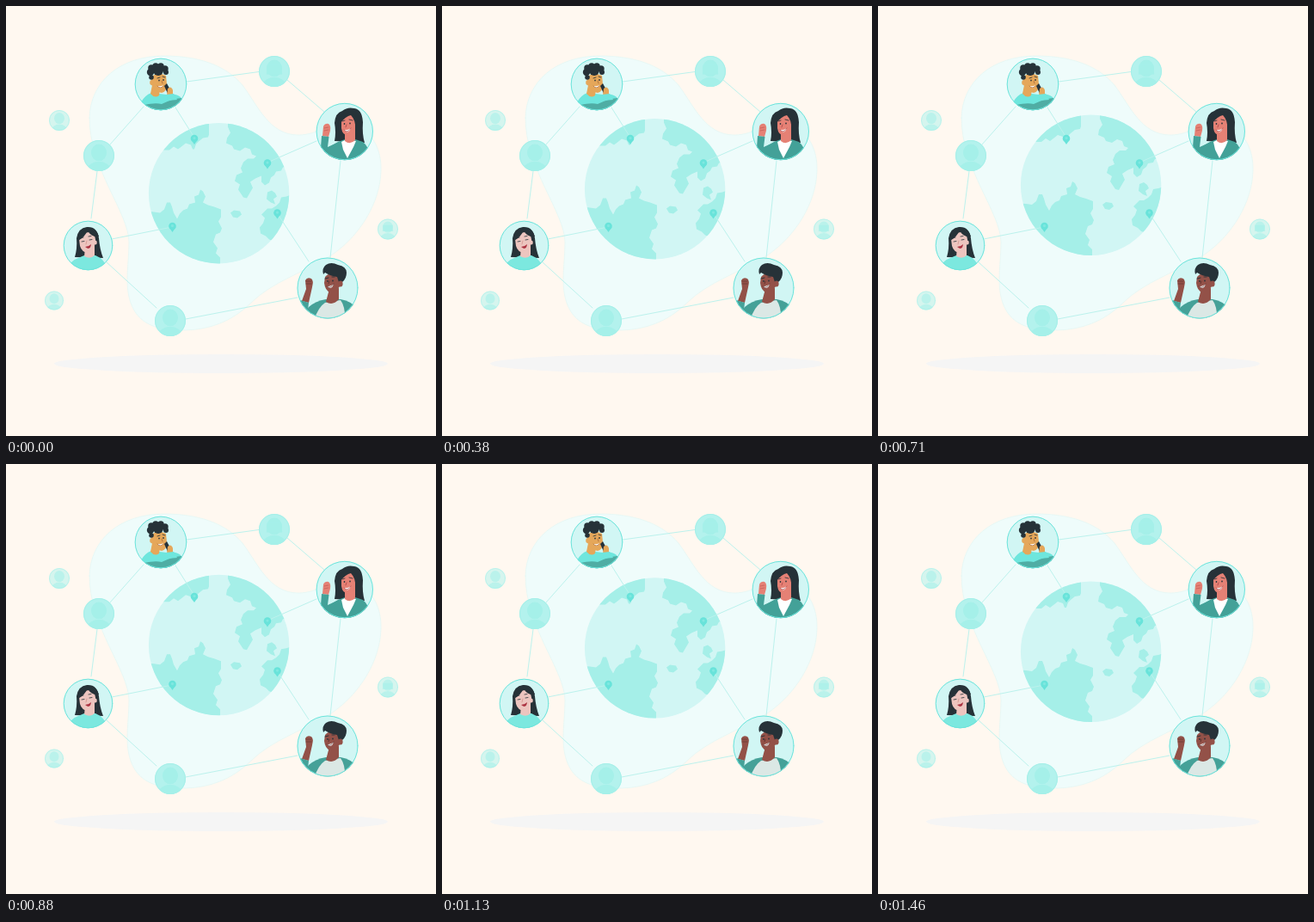
An HTML page with a canvas for the animation above (1500 ms loop, 500 by 500 pixels).

```html
<!DOCTYPE html>
<html lang="en">
<head>
<meta charset="utf-8">
<title>Connected globe</title>
<style>
html, body { margin: 0; width: 100%; height: 100%; overflow: hidden; background: #fff8f0; }
canvas { display: block; width: 100vw; height: 100vh; }
</style>
</head>
<body>
<canvas id="stage" width="500" height="500"></canvas>
<script>
const stage = document.getElementById('stage');
const ctx = stage.getContext('2d');

const LOOP = 1500, STEPS = 36, LIFT = 10;
const INK = '#263238', PALE = '#d1f6f4', LAND = '#a5efe8', AQUA = '#68e3da', LINE = '#bcf2ed';
const GLOBE = { x: 247.6, y: 218.3, r: 81.7 };

function fill(color, d) {
  ctx.fillStyle = color;
  ctx.fill(new Path2D(d));
}

function stroke(color, width, d) {
  ctx.strokeStyle = color;
  ctx.lineWidth = width;
  ctx.lineCap = 'round';
  ctx.stroke(new Path2D(d));
}

function oval(color, x, y, rx, ry = rx, turn = 0) {
  ctx.fillStyle = color;
  ctx.beginPath();
  ctx.ellipse(x, y, rx, ry, turn, 0, 7);
  ctx.fill();
}

function ring(color, width, x, y, r) {
  ctx.strokeStyle = color;
  ctx.lineWidth = width;
  ctx.beginPath();
  ctx.arc(x, y, r, 0, 7);
  ctx.stroke();
}

function clipped(x, y, r, draw) {
  ctx.save();
  ctx.beginPath();
  ctx.arc(x, y, r, 0, 7);
  ctx.clip();
  draw();
  ctx.restore();
}

function backdrop() {
  ctx.fillStyle = '#fff8f0';
  ctx.fillRect(0, 0, 500, 500);
  const blob = 'M97 130C98 88 132 58 184 58C222 58 255 68 275 92C293 116 306 150 340 150' +
    'C364 150 377 133 402 138C425 143 437 166 436 192C435 229 411 268 378 290' +
    'C345 311 310 320 284 346C262 367 236 377 205 377C175 377 141 371 141 318' +
    'C141 304 143 290 143 275C143 240 97 190 97 130Z';
  fill('#effcfb', blob);
  stroke('#e2f7f4', .7, blob);
  oval('#f5f5f5', 250, 416, 194, 11);
}

const continents = [
  'M236 130V150L235 153L229 154L224 158L221 161L219 167H217L215 162L209 160L204 164L200 167L195 164L190 168H183V130Z',
  'M258 130V141L261 148L257 154L256 160L263 163L265 167L272 169L278 165L284 167L286 173L291 175L288 178L281 178' +
    'L276 182L273 189L275 194L268 197L266 204L272 208L270 214L276 223L280 224L284 217L287 212L284 205L290 201' +
    'L297 198L297 205L301 209L306 206L308 200L312 197L314 193L320 192L322 188L335 187V130Z',
  'M304 217L309 215L313 218L315 222L311 225L313 231L308 229L303 225Z',
  'M335 219L326 222L320 223L318 229L314 233L309 236L304 236L297 243L301 247L299 253L295 258L296 265L302 268L306 272L315 275L335 250Z',
  'M261 241L265 238L272 239L274 243L269 247L264 246Z',
  'M160 239L172 240L179 241L184 237L187 229L191 229L193 234L195 241L199 248L202 242L206 238L211 236L213 231L220 229' +
    'L219 222L224 220L226 214L229 216L232 222L229 229L235 232L242 234L250 237L250 246L247 251L251 259L249 264' +
    'L244 266L241 275L246 282L244 288L249 293V305H160Z'
];

function globe(lift) {
  const { x, y, r } = GLOBE;
  ctx.save();
  ctx.translate(0, -lift);
  oval(PALE, x, y, r);
  clipped(x, y, r, () => continents.forEach(d => fill(LAND, d)));
  ctx.restore();
}

const links = 'M210 88L294 76.5M327 86L370 123M361 157L304 182M389 180L377 293M352 297L316 242' +
  'M339 339L209 364M175 351L117 298M123 271L193 257M99 247L106 192M121 161L160 117M197 118L219 153';

function pin(x, y) {
  fill(AQUA, `M${x - 3.4} ${y + 2}L${x} ${y + 7}L${x + 3.4} ${y + 2}Z`);
  oval(AQUA, x, y, 4.3);
  oval('#80e8e0', x, y - .4, 1.6);
}

// Pale contact: a bust in a disc, optionally with long hair.
function contact(x, y, r, opacity, longHair) {
  const tone = '#a5f0e9';
  ctx.globalAlpha = opacity;
  oval('#b3f2ed', x, y, r);
  clipped(x, y, r, () => {
    oval(tone, x, y - r * .2, r * .5, r * .55);
    if (longHair) fill(tone, `M${x - r * .45} ${y - r * .4}h${r * .9}l${r * .06} ${r * .6}h${-r * 1.02}Z`);
    oval(tone, x, y + r * .93, r * .75, r * .55);
  });
  ring(tone, 1, x, y, r - .5);
  ctx.globalAlpha = 1;
}

function portrait(x, y, r, draw) {
  oval(PALE, x, y, r);
  clipped(x, y, r, draw);
  ring('#6ce4db', 1, x, y, r - .5);
}

function eyes(x, y, gap) {
  oval(INK, x, y, .8, 1);
  oval(INK, x + gap, y - .5, .8, 1);
}

function caller() {
  const skin = '#e5a75a';
  fill('#6ee6dd', 'M152 123L157 112Q161 104 169 101L187 103Q199 101 204 107L212 123Z');
  fill('#4fada4', 'M160 115Q174 112 181 114Q193 108 204 107L210 124H152Z');
  fill(skin, 'M170 92L179 97L178 104Q173 108 168 102Z');
  fill(skin, 'M169 82Q177 76 186 81L187 91Q187 100 181 101Q172 100 169 91Z');
  [[168, 77, 4.2], [169, 72, 3.8], [174, 70, 3.7], [180, 70, 3.7], [185, 73, 3.7], [186, 77, 3], [177, 75, 6], [169, 83, 2.8]]
    .forEach(([x, y, r]) => oval(INK, x, y, r));
  oval(skin, 169.5, 89, 2.3, 3);
  eyes(178, 86.5, 5);
  stroke(INK, .8, 'M176 84L179 83M182 82L185 83');
  fill('#fff', 'M176 93Q180 94 183 92Q181 98 176 93Z');
  stroke('#a66433', .7, 'M176 93Q179 97 183 93M181 87L182 90');
  fill(INK, 'M184 93L187 90L193 101L189 104Z');
  fill(skin, 'M188 96Q192 92 194 98L194 104L187 104Z');
  fill('#6ee6dd', 'M186 103L195 102L199 109L188 110Z');
}

function greeter() {
  const skin = '#e58175', jacket = '#43a198';
  fill(INK, 'M382 157Q384 147 382 136Q383 124 391 122Q397 117 405 119Q414 120 415 135Q414 149 417 159Z');
  fill(jacket, 'M366 181Q373 164 386 158L394 155H406L415 158Q422 163 426 181Z');
  fill('#fff', 'M390 158L396 155L407 157L404 164L397 177L392 167Z');
  fill(skin, 'M394 146L406 142V156Q400 162 394 157Z');
  fill(skin, 'M390 132Q394 123 402 126Q408 130 407 140Q404 150 398 151Q391 150 390 142Z');
  fill(INK, 'M388 137Q389 123 401 124Q410 127 409 141L408 147L406 143Q407 133 401 127Q395 128 388 137Z');
  eyes(393.5, 137, 6.5);
  stroke(INK, .8, 'M391 134L394 133M399 132L403 133');
  fill('#fff', 'M393 144Q397 145 401 142Q398 150 393 144Z');
  stroke('#a73d40', .7, 'M393 144Q397 149 401 142M396 138L395 141');
  fill(skin, 'M369 140Q371 136 375 137Q378 139 377 145L375 152L368 151Z');
  stroke('#b85550', .6, 'M370 142L375 141M370 145L375 144');
  fill(jacket, 'M367 151L375.5 152L374 164L385 159L379 179H365Z');
}

function laugher() {
  const skin = '#edc5bf';
  fill(INK, 'M80 292Q83 282 82 270Q84 258 94 257Q106 256 108 270Q109 283 113 293Z');
  fill('#7ce8df', 'M70 309Q74 296 84 293L91 290H104Q115 294 120 309Z');
  fill(skin, 'M92 282L103 278V290Q98 295 91 291Z');
  fill(skin, 'M85 271Q89 263 97 263Q105 266 104 275Q102 285 95 287Q88 286 86 279Z');
  fill(INK, 'M84 273Q84 260 95 258Q105 257 108 268L103 268Q97 266 95 261Q92 268 84 273Z');
  oval(skin, 104, 275, 1.8, 2.5);
  stroke(INK, .8, 'M88 274L91 273.5M97 272L100 271.5M87 270L90 269M96 268L99 267.5');
  fill('#ad3543', 'M92 280Q96 280 99 277Q98 285 92 280Z');
  stroke('#cf8f87', .7, 'M94 273L93 277');
}

function waver() {
  const skin = '#935148', jacket = '#45a198';
  fill(jacket, 'M340 368L352 350Q360 343 372 341H389Q402 343 409 353L409 370H340Z');
  fill('#dbe8e5', 'M358 367Q362 351 371 345L389 342Q395 350 394 367Z');
  fill(skin, 'M376 329L387 328V341Q380 349 372 344Z');
  fill(skin, 'M371 315Q378 307 389 313L389 325Q384 332 377 333Q371 331 370 322Z');
  fill(INK, 'M369 312Q367 305 372 301Q378 297 386 301Q396 303 396 310Q396 317 391 321L387 321L385 315Q377 314 371 310Z');
  oval(skin, 389, 323, 2.6, 3.4);
  eyes(374, 320, 6);
  stroke(INK, .9, 'M371 317L375 316M379 315L382 315');
  fill('#fff', 'M373 326Q377 327 381 323Q379 331 373 326Z');
  stroke('#542c29', .7, 'M373 326Q377 330 381 323M376 320L375 323');
  fill(skin, 'M348 319Q350 315 355 317Q358 319 356 327L352 345L344 343L349 329Z');
  stroke('#643832', .7, 'M349 320L355 320M349 323L355 323');
  fill(jacket, 'M342 342L352 345L351 354L358 347L354 367H339Z');
}

function render(now) {
  const step = Math.floor((now % LOOP + 3) * STEPS / LOOP) + 1;
  const phase = step % STEPS / STEPS;
  const lift = LIFT * (1 - Math.abs(1 - 2 * phase));

  backdrop();
  globe(lift);
  stroke(LINE, 1, links);
  pin(219, 154);
  pin(304, 182.5);
  pin(193.5, 256);
  pin(315.5, 240.5);

  contact(62, 133, 12, .55);
  contact(312, 76, 18, 1, true);
  contact(108, 174, 18, 1);
  contact(444, 259.5, 12, .55, true);
  contact(56, 342.5, 11, .55);
  contact(191, 366, 18, 1);

  portrait(180, 91, 30.3, caller);
  portrait(393.8, 146, 33.2, greeter);
  portrait(95.5, 278.5, 28.8, laugher);
  portrait(374, 328, 35.5, waver);
}

const start = performance.now();
function tick() {
  render(performance.now() - start);
  requestAnimationFrame(tick);
}
tick();
</script>
</body>
</html>
```
